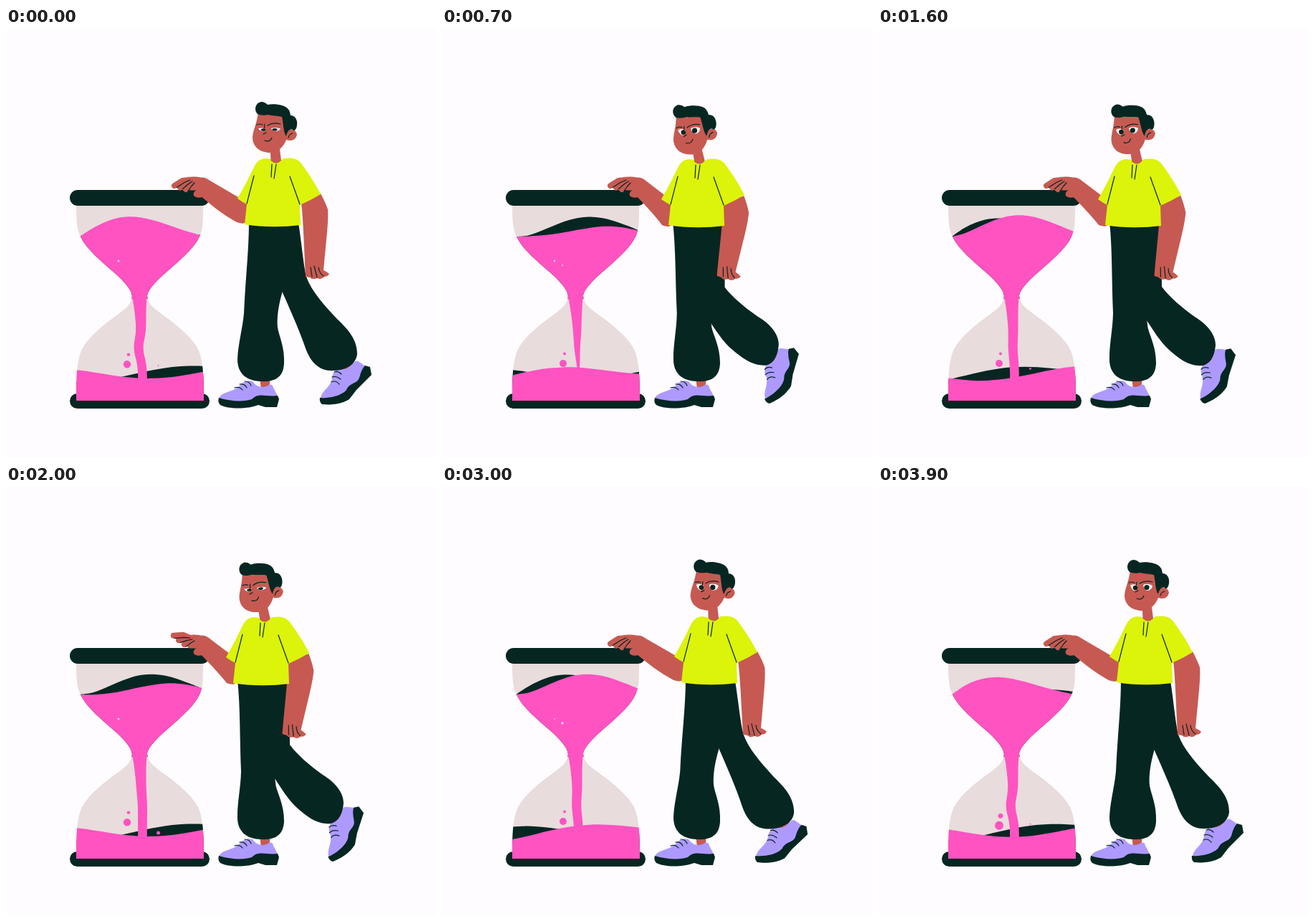
These frames come from a looping animation (600x600 px, 4000 ms). An HTML page:

```html
<!DOCTYPE html>
<html lang="en">
<head>
<meta charset="utf-8">
<title>Hourglass</title>
<style>
  html, body { margin: 0; width: 100%; height: 100%; overflow: hidden; background: #fefcff; }
  svg { display: block; width: 100%; height: 100%; }
  .dark { fill: #062622; }
  .pink { fill: #ff53c1; }
  .skin { fill: #c65a52; }
  .lilac { fill: #ae9aff; }
  .shirt { fill: #dcf30a; }
  .glass { fill: #e8dcdc; }
  .line, .finger { fill: none; stroke: #062622; stroke-width: 1.2; stroke-linecap: round; stroke-linejoin: round; }
  .finger { stroke: #c65a52; stroke-width: 8; }
</style>
</head>
<body>
<svg viewBox="0 0 600 600">
  <defs>
    <path id="bulbs" d="M98 246 C98 270 99 281 104 291 C113 310 135 327 153 343 C165 354 174 364 176 373
      C176 384 168 391 157 399 C136 414 116 430 106 448 C99 464 98 482 98 520 L276 520
      C276 482 275 464 268 448 C258 430 238 414 217 399 C206 391 197 384 197 373
      C199 364 209 354 221 343 C239 327 261 310 270 291 C275 281 275 270 275 246 Z"/>
    <clipPath id="inside"><use href="#bulbs"/></clipPath>
  </defs>

  <rect class="dark" x="89" y="510" width="195" height="21" rx="10.5"/>
  <use href="#bulbs" class="glass"/>
  <g clip-path="url(#inside)">
    <path id="lowBack" class="dark"/>
    <circle id="drip" class="pink" cx="212.5"/>
  </g>
  <circle id="bigDrop" class="pink" cx="169"/>
  <circle id="smallDrop" class="pink" cx="171"/>
  <path id="stream" class="pink"/>
  <g clip-path="url(#inside)">
    <path id="lowFront" class="pink"/>
    <path id="topBack" class="dark"/>
    <path id="topFront" class="pink"/>
  </g>
  <g fill="#ffd3ef">
    <circle id="speckA" cx="157" cy="325"/>
    <circle id="speckB" cx="168" cy="331"/>
  </g>
  <rect class="dark" x="89" y="226" width="195" height="22" rx="11"/>

  <g id="backShoe">
    <path class="skin" d="M468 470 L484 464 L484 477 L470 480 Z"/>
    <path class="lilac" d="M439 516 C441 505 454 501 455 488 C456 480 461 476 467 473 C472 481 482 471 486 466
      Q489 463 493 466 L502 472 L496 496 L466 518 Z"/>
    <path class="dark" d="M438 516 C452 517 468 513 475 505 C480 494 490 497 493 488 Q496 476 501 471
      L508 473 L510 484 L489 505 L479 518 C466 526 450 526 441 525 Q437 522 438 516 Z"/>
    <path class="line" d="M458 480 Q463 478 468 483 M455 487 Q461 485 467 490 M454 494 Q460 491 465 497"/>
  </g>
  <path class="skin" d="M354 488 H369 L367 504 H356 Z"/>
  <path class="lilac" d="M297 518 C299 507 316 509 325 500 C331 493 338 491 344 493 C350 502 360 503 367 498
    Q372 496 373 502 L380 515 L360 524 H305 Z"/>
  <path class="dark" d="M297 516 C313 521 332 522 343 518 C353 508 362 515 379 513 L381 518 L378 529
    L362 529 L352 526 C337 532 310 532 299 526 Q295 522 297 516 Z"/>
  <path class="line" d="M319 502 Q326 500 330 505 M326 497 Q333 496 336 502 M333 493 Q340 493 342 499"/>

  <path id="backLeg" class="dark"/>
  <path id="frontLeg" class="dark"/>
  <path id="frontArm" class="skin"/>
  <path class="skin" d="M284 213 C272 207 262 207 254 208 L249 214 L254 226 Q262 227 266 226
    C262 228 261 231 262 234 C266 238 272 237 281 234 Z"/>
  <g id="fingers"></g>
  <g id="sideArm">
    <path class="skin" d="M412 244 L439 231 Q446 244 449 253 Q450 262 448 285 L443 338 Q448 340 451 343
      Q449 347 444 347 Q440 352 434 349 Q428 352 424 348 L418 347 C416 310 415 270 412 244 Z"/>
    <path class="line" d="M425 334 L427 347 M430 332 L434 348 M436 334 Q437 342 443 346"/>
  </g>
  <g id="torso">
    <path class="shirt" d="M363 182 C355 182 350 186 346 194 C338 211 330 226 323 238 Q330 243 336 246
      L333 274 Q370 280 411 275 L410 247 Q426 240 439 232 C430 214 420 200 412 189
      C406 181 396 181 387 182 C383 187 371 187 369 183 Z"/>
    <path class="line" d="M346 206 L336 245 M396 207 L410 246 M371 190 L370 208 M377 190 L374 210"/>
  </g>

  <g id="head">
    <path class="skin" d="M352 117 C350 135 344 143 344 154 C345 168 357 174 369 174 L369.5 185
      Q377 192 384 185 L382 169 Q388 164 391 156 Q403 160 406 149 Q405 141 396 142 L388 116 Z"/>
    <path class="dark" d="M351 120 C346 115 347 105 356 103 Q361 103 365 107 C373 105 385 107 390 110
      Q396 113 397 122 C404 122 407 129 406 136 C405 142 402 145 400 142 C395 140 392 146 391 151
      C387 146 387 132 385 124 C378 122 372 123 366 121 C361 122 355 122 351 120 Z"/>
    <g id="eyes">
      <path fill="#fff" d="M352 138 Q358 136 362 139 Q362 146 357 146 Q353 143 352 138 Z
        M370 138 Q376 135 383 139 Q382 145 376 146 Q371 145 370 138 Z"/>
      <circle class="dark" cx="359" cy="142" r="3.3"/>
      <circle class="dark" cx="375" cy="141.5" r="3.6"/>
    </g>
    <path class="line" d="M350 135 Q354 133 358 135 M365 136 Q373 131 383 134 M361 134 L360 143
      M359 148 L363 146 M361 157 Q368 160 371 153 M394 153 Q395 148 400 147"/>
  </g>
</svg>
<script>
const LOOP = 4000, STEP = 100, TAU = 2 * Math.PI;
const $ = id => document.getElementById(id);
const set = (id, name, value) => $(id).setAttribute(name, value);
const lerp = (a, b, k) => a + (b - a) * k;
const frac = v => v - Math.floor(v);

// Smooth path through f(0) .. f(1)
function trace(f, n) {
  const at = i => f(Math.min(Math.max(i, 0), n) / n);
  let d = '';
  for (let i = 0; i < n; i++) {
    const p = at(i - 1), q = at(i), r = at(i + 1), s = at(i + 2);
    d += `C${[0, 1].map(j => q[j] + (r[j] - p[j]) / 6)} ${[0, 1].map(j => r[j] - (s[j] - q[j]) / 6)} ${r}`;
  }
  return `${at(0)}${d}`;
}

// Each wave: mean height, swing and phase across the width s
const topWave = {
  x: 103, width: 171, floor: 378,
  mean: s => 291 - 5 * s - 16 * Math.sin(Math.PI * s),
  swing: s => 5 * s + 10 * Math.sin(Math.PI * s ** .7),
  lag: s => .52 * s - .13
};
const lowWave = {
  x: 97, width: 180, floor: 521,
  mean: s => 485 - 7 * s,
  swing: s => 10 - 3 * s,
  lag: s => .1 + .62 * s
};
function surface(w, phase) {
  const edge = s => [w.x + s * w.width, w.mean(s) - w.swing(s) * Math.cos(TAU * (phase - w.lag(s)))];
  return `M${trace(edge, 10)}V${w.floor}H${w.x}Z`;
}

function stream(t) {
  const u = t / LOOP;
  const bend = -2 - 1.2 * Math.cos(TAU * u) - 1.5 * Math.cos(3 * TAU * u);
  const pinch = Math.exp(-(((t - 800) / 350) ** 2));
  const side = dir => s => {
    const y = 370 + 124 * s;
    const mid = 186 + 4.5 * Math.sin(Math.PI * s / 2) + bend * Math.exp(-(((y - 447) / 18) ** 2));
    const half = Math.max(.3, 6.3 + 5 * Math.exp(-5 * s) - 7 * pinch * s * s);
    return [mid + dir * half, y];
  };
  return `M${trace(side(-1), 12)}L${trace(s => side(1)(1 - s), 12)}Z`;
}

// Planted leg: the hip slides, the foot stays
function frontLeg(k) {
  const rest = 'M339 270 Q375 274 408 272 L396 340 C385 365 377 395 379 418 C381 430 389 445 388 468 C387 490 372 494 355 493 C335 492 323 482 323 462 C324 440 330 420 332 398 C334 350 339 310 339 270 Z';
  return rest.replace(/(\d+) (\d+)/g, (_, x, y) =>
    `${x - 16 * k * Math.max(0, 1 - (y - 270) / 195) ** 1.3} ${y}`);
}
// Swinging leg: blend of planted and lifted shapes
function backLeg(k) {
  const low = 'M350 271 L408 271 C413 305 415 330 419 347 C426 367 445 388 462 406 C478 421 490 435 490 455 C488 472 470 479 452 478 C436 477 425 466 418 447 C409 420 394 388 382 360 Z';
  const high = 'M335 271 L394 271 C395 305 396 335 396 361 C405 374 425 391 442 403 C462 415 471 430 471 442 C470 460 461 473 447 471 C433 471 418 460 406 449 C393 437 383 420 373 405 Z';
  const to = high.match(/\d+/g);
  let i = 0;
  return low.replace(/\d+/g, v => lerp(+v, to[i++], k));
}
function frontArm(k) {
  const x = v => v - 14 * k, y = v => v + 4 * k;
  return `M270 209 Q277 207 283 212 L${324 - 4 * k} ${y(236)} L${x(339)} 246 L${x(335)} ${y(270)}
    Q${x(333)} ${y(275)} ${x(322)} ${y(271)} Q298 ${y(258)} 270 233 Z`;
}

const FINGERS = [0, 1, 2];
const knuckle = i => [257 + 3 * i, 212 + 2 * i];
function addFingers() {
  const bone = (i, dx, dy) =>
    `M${knuckle(i)} L${246 + 5 * i + dx} ${213 + 2.5 * i + dy} L${235 + 8 * i + dx} ${220 + 2.5 * i + dy}`;
  const add = (cls, dx, dy) => FINGERS.map(i =>
    `<path class="${cls}" data-i="${i}" d="${bone(i, dx, dy)}"/>`).join('');
  $('fingers').innerHTML = add('finger', 0, 0) + add('line', 3, 2.5);
}

// Cosine easing between a few [time, value] keys
function ease(keys, t) {
  const i = keys.findIndex(k => k[0] > t);
  if (i < 1) return keys[0][1];
  const [t0, a] = keys[i - 1], [t1, b] = keys[i];
  return lerp(a, b, (1 - Math.cos(Math.PI * (t - t0) / (t1 - t0))) / 2);
}
const lean = [[50, 0], [650, 1.14], [1250, 1], [2250, 1], [2900, -.15], [3550, 0], [4001, 0]];
const tap = [[60, 0], [200, 1], [440, 1], [580, 0], [801, 0]];
const bob = [[0, .2], [.06, 0], [.55, 0], [.83, 1], [1.01, .15]];

function circle(id, r, y) {
  set(id, 'r', Math.max(r, 0));
  if (y) set(id, 'cy', y);
}

function drawPerson(t) {
  const k = ease(lean, t);
  const body = lerp(Math.min(Math.max(k, 0), 1), k, .45);
  set('head', 'transform', `translate(${-15 * k} ${k}) rotate(${-6 * k} 377 187)`);
  set('torso', 'transform', `translate(${-16 * body} ${body})`);
  set('sideArm', 'transform', `translate(${-17 * body} ${body}) rotate(${8 * body} 425 235)`);
  set('backShoe', 'transform', `translate(${13 * body} 0) rotate(${-27 * body} 440 520)`);
  set('frontLeg', 'd', frontLeg(body));
  set('backLeg', 'd', backLeg(body));
  set('frontArm', 'd', frontArm(body));

  const lift = ease(tap, t % 800);
  for (const el of $('fingers').children) {
    const i = +el.dataset.i;
    el.setAttribute('transform', `rotate(${lift * (28 - 5 * i)} ${knuckle(i)})`);
  }
  const blink = t % 2000;
  const open = blink < 300 ? .12 + .0038 * Math.abs(blink - 100) : 1;
  set('eyes', 'transform', `translate(0 142) scale(1 ${open}) translate(0 -142)`);
}

function drawGlass(t) {
  const top = t * 3 / LOOP, low = t * 2 / LOOP;
  set('topFront', 'd', surface(topWave, top));
  set('topBack', 'd', surface(topWave, top - .25));
  set('lowFront', 'd', surface(lowWave, low));
  set('lowBack', 'd', surface(lowWave, low - .35));
  set('stream', 'd', stream(t));

  const b = ease(bob, frac(t * 6 / LOOP)), c = Math.cos(TAU * top), u = frac(low);
  circle('bigDrop', 5 + b, 468 + 6 * b);
  circle('smallDrop', 2 + 1.5 * b, 454.5 + 6 * b);
  circle('drip', 1.7 - .8 * c, 477.5 - 6.5 * c);
  circle('speckA', Math.min(1.5, 2.4 - 3 * u));
  circle('speckB', 1.7 * Math.sin(TAU * (u - .25)));
}

addFingers();
const start = performance.now();
function tick() {
  const t = Math.floor((performance.now() - start) % LOOP / STEP) * STEP;
  drawPerson(t);
  drawGlass(t);
  requestAnimationFrame(tick);
}
tick();
</script>
</body>
</html>
```
